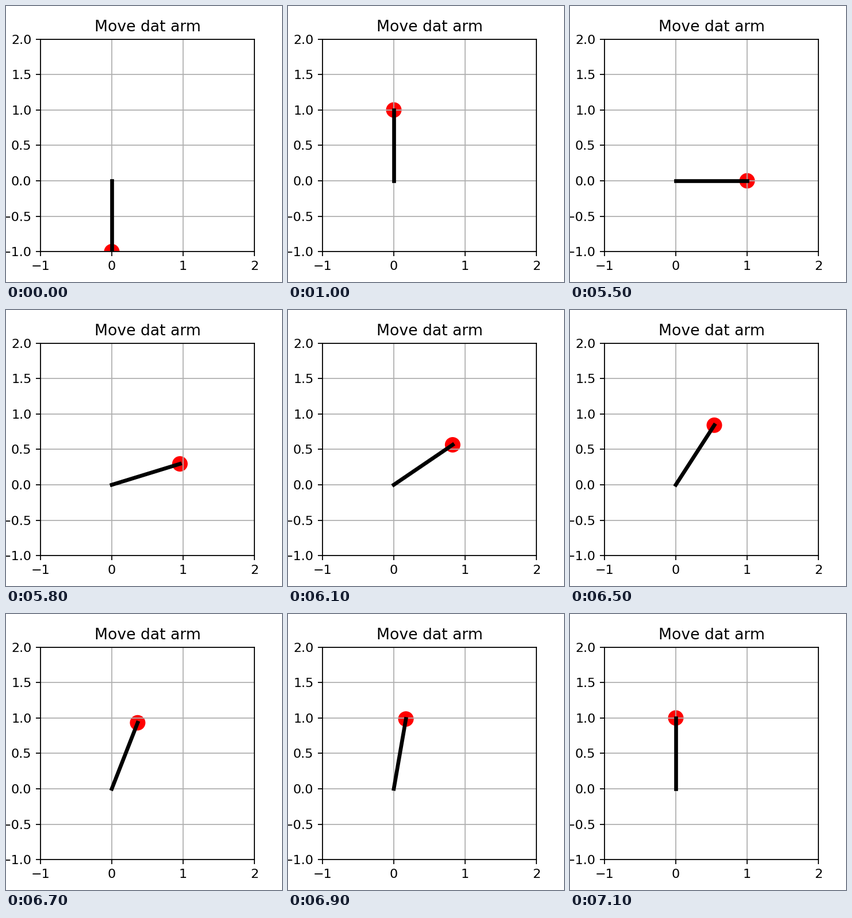
A matplotlib script that plays this animation: 480 by 480 pixels, repeating every 8000 ms.

```python
import math

import matplotlib.pyplot as plt
from matplotlib.animation import FuncAnimation
from matplotlib.patches import Circle

STEP_MS = 100
FRAMES = 80
UP_AT, SWING_AT = 10, 55
STEP_RAD = 0.1

fig, ax = plt.subplots(figsize=(3, 3), dpi=160)
ax.set_xlim(-1, 2)
ax.set_ylim(-1, 2)
ax.set_xticks([-1, 0, 1, 2])
ax.set_yticks([-1, -0.5, 0, 0.5, 1, 1.5, 2])
ax.grid(True)
ax.set_title("Move dat arm")

hand = ax.add_patch(Circle((0, -1), 0.1, color="red"))
arm, = ax.plot([0, 0], [0, -1], color="black", lw=3)


def angle(n):
    """Hang down, point up, then swing from the right back up."""
    if n < UP_AT:
        return -math.pi / 2
    if n < SWING_AT:
        return math.pi / 2
    return min((n - SWING_AT) * STEP_RAD, math.pi / 2)


def draw(n):
    a = angle(n)
    x, y = math.cos(a), math.sin(a)
    arm.set_data([0, x], [0, y])
    hand.center = (x, y)
    return hand, arm


anim = FuncAnimation(fig, draw, frames=FRAMES, interval=STEP_MS,
                     repeat=True, repeat_delay=0)
plt.show()
```
